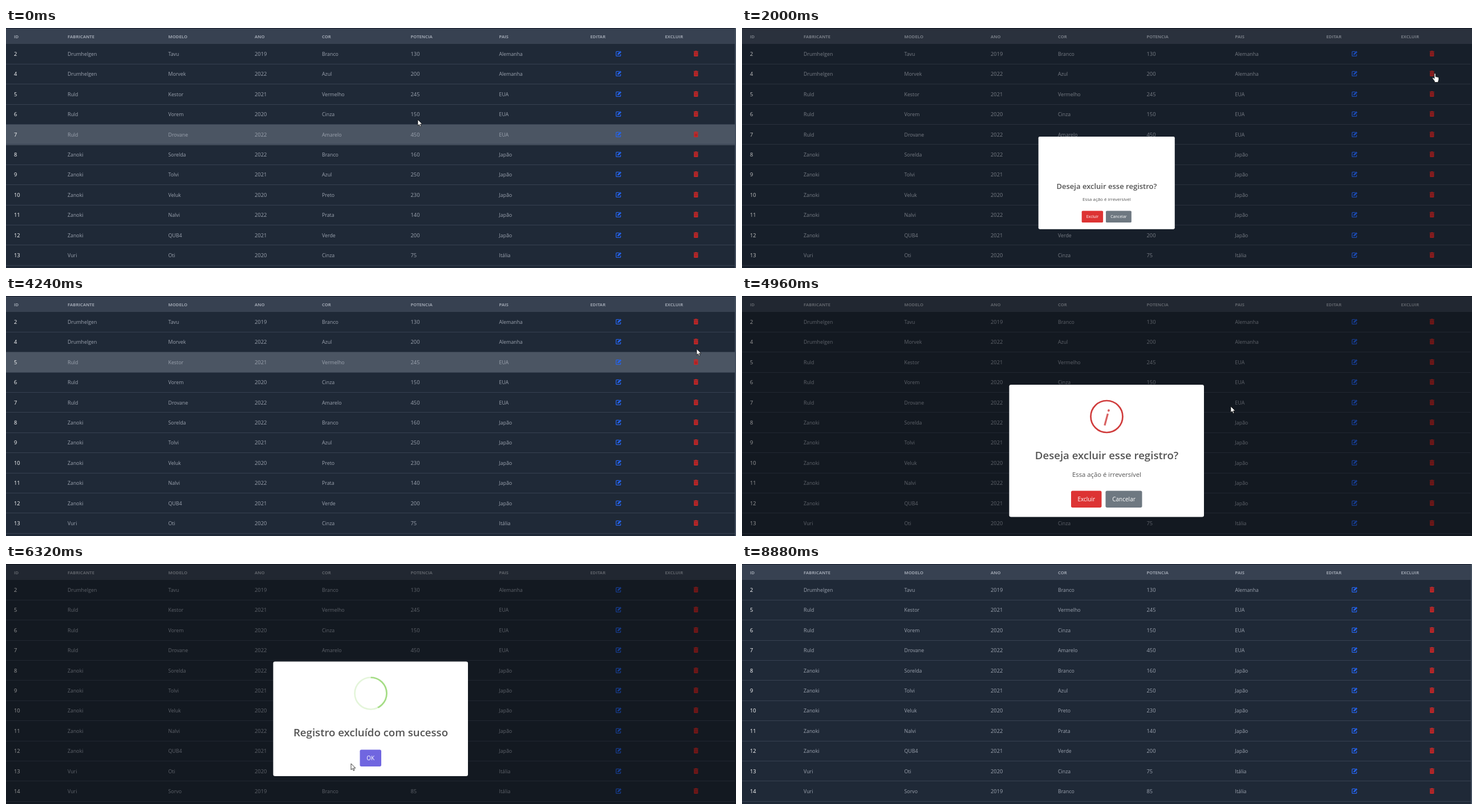
An HTML page for the animation above (8960 ms loop, 1280 by 422 pixels).

```html
<!DOCTYPE html>
<html lang="pt">
<head>
<meta charset="utf-8">
<style>
html, body { margin: 0; width: 100%; height: 100%; overflow: hidden; background: #1f2937; }
svg { display: block; width: 1280px; height: 422px; font-family: "Open Sans", "Noto Sans", sans-serif; }
.head { font-size: 7.65px; font-weight: 700; fill: #9ca3af; }
.cell { font-size: 8.8px; fill: #9ca3af; }
.num { font-size: 9.4px; }
.id { fill: #fff; }
.popup { text-anchor: middle; fill: #545454; }
.title { font-size: 18.6px; font-weight: 600; }
.note { font-size: 11.3px; }
.btn text { font-size: 10px; fill: #fff; }
</style>
</head>
<body>
<svg viewBox="0 0 1280 422">
  <defs>
    <g id="edit" fill="none" stroke="#2563eb">
      <path d="M1 -3.6H-3.2Q-4.2 -3.6 -4.2 -2.6V3.4Q-4.2 4.4 -3.2 4.4H2.6Q3.6 4.4 3.6 3.4V1" stroke-width="1.3"/>
      <path d="M-1.7 2L-1.3 -.1L3 -4.4L4.8 -2.6L.5 1.7Z" fill="#2563eb" stroke-width=".5"/>
    </g>
    <g id="trash">
      <path d="M-4 -4.2H-1.6L-1.1 -5H1.1L1.6 -4.2H4V-2.9H-4ZM-3.6 -2.4H3.6V4Q3.6 5 2.6 5H-2.6Q-3.6 5 -3.6 4Z" fill="#c62828"/>
      <path d="M-1.6 -1V3.6M0 -1V3.6M1.6 -1V3.6" stroke="#7c2029" stroke-width=".6"/>
    </g>
  </defs>
  <rect width="1280" height="422" fill="#1f2937"/>
  <g id="rows"></g>
  <rect width="1280" height="28" fill="#374151"/>
  <rect width="1280" height="1" fill="#111827"/>
  <g id="heads" class="head"></g>
  <rect id="edge" x="1278" width="2" height="422" fill="#465160"/>
  <rect id="shade" width="1280" height="422"/>

  <g id="ask" class="popup">
    <rect x="468.5" y="156" width="341.5" height="232.5" rx="3.3" fill="#fff"/>
    <g id="info">
      <circle r="28" fill="none" stroke="#cf3838" stroke-width="2.7"/>
      <text id="mark" y="16" font-size="40" fill="#cf3838">i</text>
    </g>
    <text class="title" x="639.5" y="287">Deseja excluir esse registro?</text>
    <text class="note" x="639.5" y="318.3">Essa ação é irreversível</text>
    <g class="btn">
      <rect id="yes" x="577" y="342.5" width="53.5" height="29.5" rx="2.7"/>
      <text x="603.8" y="361">Excluir</text>
      <rect id="no" x="637.5" y="342.5" width="64" height="29.5" rx="2.7"/>
      <text x="669.5" y="361">Cancelar</text>
    </g>
  </g>

  <g id="done" class="popup">
    <rect x="468.5" y="171.5" width="341.5" height="201.5" rx="3.3" fill="#fff"/>
    <g transform="translate(639.5 227.5) scale(10.667)">
      <circle r="2.625" fill="none" stroke="#a5dc86" stroke-width=".25"/>
      <path d="M0 -3.75A3.75 3.75 0 0 0 0 3.75Z" fill="#fff" transform="translate(-.8135 .8125) rotate(-45)"/>
      <path id="sweep" d="M0 -3.75A3.75 3.75 0 0 1 0 3.75Z" fill="#fff"/>
      <rect x="-.219" y="-2.8125" width=".4375" height="5.625" fill="#fff" transform="translate(-.656 .8125) rotate(-45)"/>
      <circle r="2.625" fill="none" stroke="#a5dc86" stroke-opacity=".3" stroke-width=".25"/>
      <rect id="tip" height=".3125" y="-.156" rx=".125" fill="#a5dc86"/>
      <rect id="long" height=".3125" y="-.156" rx=".125" fill="#a5dc86"/>
    </g>
    <text class="title" x="639.5" y="302.5">Registro excluído com sucesso</text>
    <g class="btn">
      <rect id="ok" x="620.5" y="326.5" width="37.5" height="29.5" rx="2.7"/>
      <text x="639.3" y="345.3">OK</text>
    </g>
  </g>

  <g fill="#fff" stroke="#111" stroke-width=".8" stroke-linejoin="round">
    <path id="arrow" d="M0 0V10.8L2.5 8.5L4.2 12.4L6 11.6L4.3 7.9H7.8Z"/>
    <path id="hand" d="M-1.2 1q0-1.2 1.2-1.2t1.2 1.2v4.5l4.6 1q1 .4 1 1.5v2.5q0 1.6-1 3v2h-6.5v-2l-3.4-4.5q-.7-1.2 .5-1.7t2.6 1.6z"/>
  </g>
</svg>
<script>
const LOOP = 8960, STEP = 80, PITCH = 35.4, TOP = 28;
const $ = id => document.getElementById(id);
const set = (el, attrs) => { for (const k in attrs) el.setAttribute(k, attrs[k]); };
const clamp = x => Math.max(0, Math.min(1, x));

// Table
const columns = [14, 108, 284.5, 436, 554, 709.5, 864.5, 1024.5, 1155.5];
const titles = 'ID FABRICANTE MODELO ANO COR POTENCIA PAIS EDITAR EXCLUIR'.split(' ');
const cars = `2 Drumhelgen Tavu 2019 Branco 130 Alemanha
4 Drumhelgen Morvek 2022 Azul 200 Alemanha
5 Ruld Kestor 2021 Vermelho 245 EUA
6 Ruld Vorem 2020 Cinza 150 EUA
7 Ruld Drovane 2022 Amarelo 450 EUA
8 Zanoki Sorelda 2022 Branco 160 Japão
9 Zanoki Tolvi 2021 Azul 250 Japão
10 Zanoki Veluk 2020 Preto 230 Japão
11 Zanoki Nalvi 2022 Prata 140 Japão
12 Zanoki QUB4 2021 Verde 200 Japão
13 Vuri Oti 2020 Cinza 75 Itália
14 Vuri Sorvo 2019 Branco 85 Itália`.split('\n').map(line => line.split(' '));

$('heads').innerHTML = titles.map((s, i) => `<text x="${columns[i]}" y="17.8">${s}</text>`).join('');
$('rows').innerHTML = cars.map(car => '<g><rect width="1278" height="36"/>' +
  '<rect width="1278" height="1" fill="#374151"/>' +
  car.map((s, i) => `<text class="cell ${isNaN(s) ? '' : 'num'} ${i ? '' : 'id'}" x="${columns[i]}" y="21.3">${s}</text>`).join('') +
  '<use href="#edit" x="1074" y="17"/><use href="#trash" x="1209.8" y="17"/></g>').join('');
const rows = [...$('rows').children];

// Easing and keyframes
function bezier(x1, y1, x2, y2) {
  const at = (s, a, b) => 3 * (1 - s) ** 2 * s * a + 3 * (1 - s) * s * s * b + s ** 3;
  return x => {
    let lo = 0, hi = 1;
    for (let i = 0; i < 24; i++) {
      const mid = (lo + hi) / 2;
      if (at(mid, x1, x2) < x) lo = mid; else hi = mid;
    }
    return at(lo, y1, y2);
  };
}
const ease = bezier(.25, .1, .25, 1), easeIn = bezier(.42, 0, 1, 1);

function keyed(x, keys, curve = ease) {
  const i = keys.findIndex(k => k[0] > x);
  if (i < 1) return keys[i ? keys.length - 1 : 0].slice(1);
  const a = keys[i - 1], b = keys[i], p = curve((x - a[0]) / (b[0] - a[0]));
  return a.slice(1).map((v, j) => v + (b[j + 1] - v) * p);
}

// Popups: element, opening time, closing time
const shows = [['ask', 2000, 3345], ['ask', 4560, 5800], ['done', 5951, 7960]];
const LEAD = 35, FADE = 100, HIDE = 150, REMOVED = 5951;
const pop = [[0, .7], [.45, 1.05], [.8, .95], [1, 1]];
const wobble = [[0, 45, 0], [.25, -25, .4], [.5, 15, .8], [.75, -5, 1], [1, 0, 1]];
const tipKeys = [[.54, 1.0625, .125, 0], [.7, 2.1875, -.375, 3.125], [.84, 3, 1.3125, 1.0625], [1, 2.8125, .8125, 1.5625]];
const longKeys = [[.65, 3.375, 2.875, 0], [.84, 2.1875, 0, 3.4375], [1, 2.375, .5, 2.9375]];

const path = [[-80, 718, 185], [0, 722, 161], [300, 780, 138], [800, 1030, 112], [1300, 1190, 92],
  [1600, 1215, 80], [2200, 1215, 80], [2600, 960, 220], [3000, 690, 345], [3150, 668, 354], [3345, 668, 354],
  [3440, 704, 346], [3700, 900, 240], [4000, 1160, 120], [4240, 1211, 93], [4400, 1214, 80], [4640, 1214, 80],
  [4960, 857, 194], [5300, 650, 335], [5500, 603, 356], [5850, 603, 356], [6320, 605, 351], [6900, 615, 347],
  [7300, 641, 343], [7960, 641, 343], [8300, 650, 372], [8640, 655, 425], [8700, 655, 440]];
const cursorAt = t => keyed(t, path, x => x);

const buttons = { ask: [['yes', '#dd3333', '#c72e2e'], ['no', '#6e7881', '#636c74']], done: [['ok', '#7066e0', '#655cca']] };
const inside = (el, x, y) => {
  const [l, t, w, h] = ['x', 'y', 'width', 'height'].map(k => +el.getAttribute(k));
  return x >= l && x <= l + w && y >= t && y <= t + h;
};

function drawRows(t, open) {
  const removed = t >= REMOVED, [, hoverY] = cursorAt(t - STEP);
  rows.forEach((row, i) => {
    const gone = removed && i === 1;
    const top = TOP + PITCH * (removed && i > 1 ? i - 1 : i), y = Math.round(top);
    const hot = !open && hoverY >= top && hoverY < top + PITCH;
    set(row, { transform: `translate(0 ${y})`, display: gone ? 'none' : 'inline' });
    set(row.children[0], { fill: hot ? '#4b5563' : 'none' });
    set(row.children[1], { y: Math.floor(top + PITCH - .01) - y });
  });
}

function drawPopup(t) {
  let shade = 0, open = null;
  set($('ask'), { display: 'none' });
  set($('done'), { display: 'none' });
  for (const [id, start, end] of shows) {
    const age = t - start;
    if (age < -LEAD || t >= end + HIDE) continue;
    shade = Math.max(shade, ease(clamp((age + LEAD) / FADE)) * (1 - ease(clamp((t - end) / FADE))));
    open = id;
    if (age < 0) continue;
    const out = ease(clamp((t - end) / HIDE));
    const scale = t < end ? keyed(age / 300, pop)[0] : 1 - out / 2;
    set($(id), {
      display: 'inline', opacity: 1 - out,
      transform: `translate(639.3 272.3) scale(${scale}) translate(-639.3 -272.3)`
    });
    if (id === 'ask') drawInfo(age); else drawSuccess(age);
  }
  set($('shade'), { 'fill-opacity': shade * .4 });
  set($('edge'), { display: open ? 'none' : 'inline' });
  return open;
}

function drawInfo(age) {
  const p = ease(clamp(age / 500)), [angle, alpha] = keyed(age / 800, wobble);
  const tilt = Math.cos((1 - p) * 100 * Math.PI / 180);
  set($('info'), { transform: `translate(639.5 212) scale(1 ${tilt})`, opacity: p });
  set($('mark'), { transform: `rotate(${angle} 0 2)`, opacity: alpha });
}

function drawSuccess(age) {
  const turn = -45 - 360 * easeIn(clamp((age / 4250 - .05) / .07));
  set($('sweep'), { transform: `translate(-.625 .5625) rotate(${turn})` });
  const stroke = (id, x, top, w, angle) =>
    set($(id), { x: -w / 2, width: w, transform: `translate(${x} ${top - 2.344}) rotate(${angle})` });
  const [tipTop, left, tipW] = keyed(age / 750, tipKeys);
  const [longTop, right, longW] = keyed(age / 750, longKeys);
  stroke('tip', left + tipW / 2 - 2.5, tipTop, tipW, 45);
  stroke('long', 2.5 - right - longW / 2, longTop, longW, -45);
}

function drawCursor(t, open) {
  const [x, y] = cursorAt(t);
  let hand = false;
  for (const id in buttons) for (const [name, base, hover] of buttons[id]) {
    const hot = open === id && inside($(name), x, y);
    set($(name), { fill: hot ? hover : base });
    hand = hand || hot;
  }
  const overTable = !open || t < 2240 || (t > 4500 && t < 4680);
  const offset = (y - TOP) % PITCH - 17;
  if (overTable && y > TOP && Math.abs(offset) < 7 && Math.abs(x - 1210) < 7) hand = true;
  for (const id of ['arrow', 'hand'])
    set($(id), { transform: `translate(${x} ${y})`, display: (id === 'hand') === hand ? 'inline' : 'none' });
}

function frame(now) {
  const t = Math.floor(now % LOOP / STEP) * STEP;
  const open = drawPopup(t);
  drawRows(t, open);
  drawCursor(t, open);
  requestAnimationFrame(frame);
}
frame(0);
</script>
</body>
</html>
```
